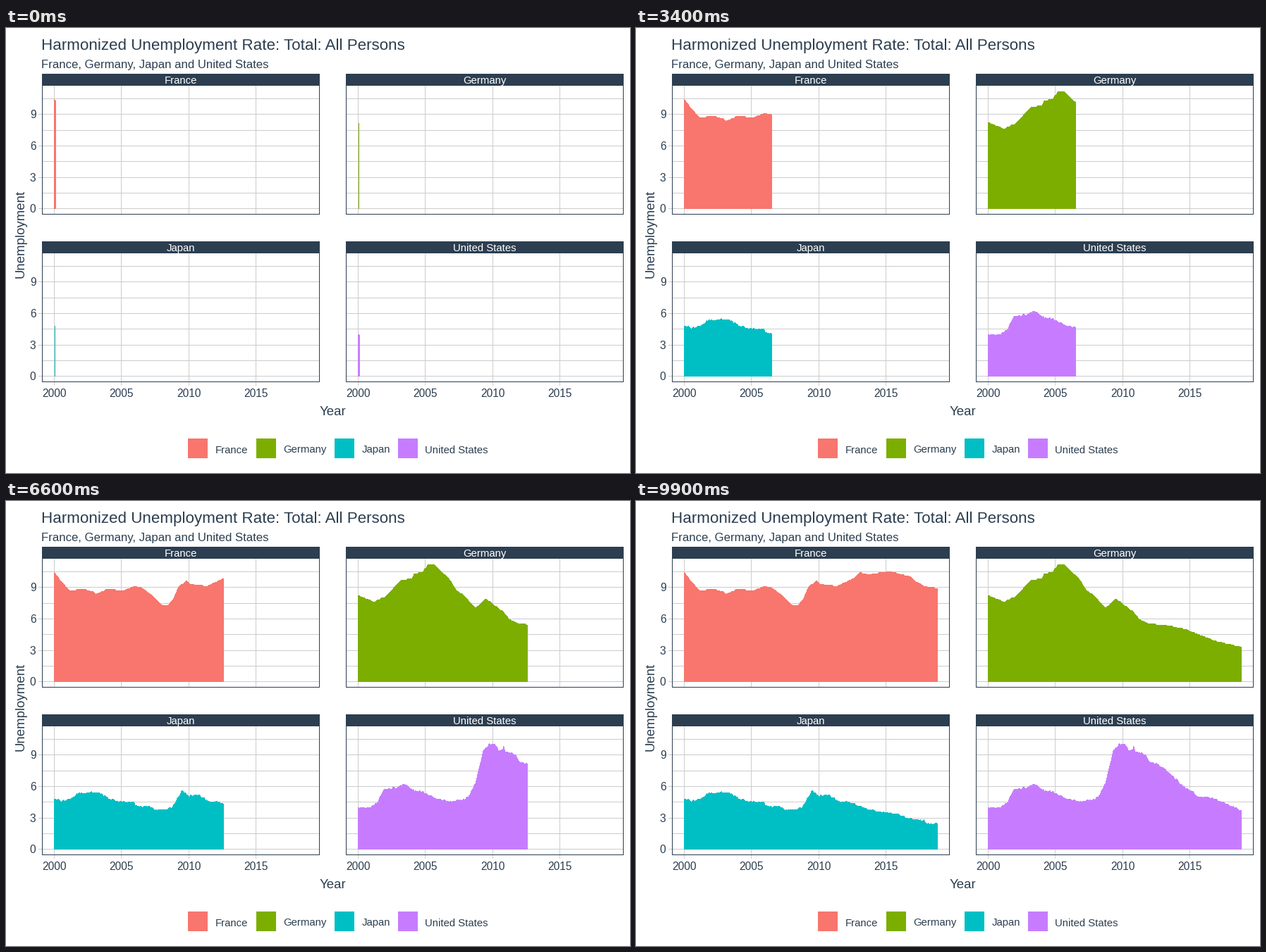
Animation, 885 px wide and 632 px high, one loop 10000 ms. Source, as a matplotlib script:

```python
import numpy as np
import matplotlib.pyplot as plt
from matplotlib.animation import FuncAnimation
from matplotlib.patches import Polygon, Rectangle

W, H, DPI = 885, 632, 64
FRAMES, LAST = 100, 226          # LAST: months after January 2000
NAVY, GREY = "#2c3e50", "#cccccc"
PT = 72 / DPI                    # points per pixel
UNIT = 14.88                     # pixels per percentage point
MONTH = 358.2 / LAST             # pixels per month

plt.rcParams["font.family"] = "Liberation Sans"

# Turning points: (month, rate)
FRANCE = [
    (0, 10.4), (6, 9.5), (13, 8.7), (26, 8.8), (34, 8.6), (37, 8.3),
    (47, 8.8), (62, 8.7), (72, 9.1), (79, 8.9), (88, 8.1), (96, 7.3),
    (102, 7.3), (106, 7.8), (111, 9), (118, 9.6), (121, 9.3), (136, 9.1),
    (151, 9.8), (157, 10.4), (164, 10.2), (184, 10.5), (202, 10),
    (206, 9.6), (214, 9.1), (226, 8.9),
]
GERMANY = [
    (0, 8.2), (14, 7.6), (24, 8.1), (39, 9.7), (48, 9.8), (50, 10.3),
    (57, 10.4), (63, 11.2), (67, 11.2), (81, 9.8), (88, 8.6), (92, 8.4),
    (105, 7), (114, 7.9), (130, 6.6), (134, 6), (143, 5.5), (157, 5.4),
    (176, 5), (202, 3.9), (226, 3.3),
]
JAPAN = [
    (0, 4.8), (5, 4.6), (15, 4.8), (21, 5.3), (39, 5.4), (47, 4.9),
    (57, 4.6), (71, 4.4), (73, 4.1), (86, 4), (90, 3.7), (105, 3.9),
    (111, 5), (114, 5.5), (120, 5.1), (129, 5.1), (139, 4.5), (147, 4.5),
    (167, 3.7), (191, 3.3), (205, 2.8), (215, 2.7), (217, 2.4), (226, 2.4),
]
STATES = [
    (0, 4), (11, 3.9), (17, 4.5), (23, 5.7), (33, 5.8), (41, 6.2),
    (49, 5.6), (59, 5.4), (65, 5), (81, 4.5), (93, 4.7), (99, 5),
    (105, 6.4), (112, 9.4), (117, 10), (123, 9.9), (125, 9.4), (129, 9.4),
    (130, 9.8), (131, 9.3), (140, 9), (144, 8.3), (151, 8.1), (156, 7.8),
    (171, 6.3), (188, 5), (200, 4.9), (226, 3.7),
]

rng = np.random.default_rng(4)
fig = plt.figure(figsize=(W / DPI, H / DPI), dpi=DPI, facecolor="white")
ax = fig.add_axes([0, 0, 1, 1])
ax.set_xlim(0, W)
ax.set_ylim(H, 0)
ax.axis("off")


def text(x, y, s, px, color=NAVY, **kw):
    return ax.text(x, y, s, fontsize=px * PT, color=color, va="baseline",
                   **kw)


def box(x, y, w, h, color, z=2):
    patch = Rectangle((x, y), w, h, fc=color, ec="none", lw=0, zorder=z)
    return ax.add_patch(patch)


def hline(x0, x1, y, color=GREY, z=1):
    box(x0, np.floor(y), x1 - x0, 1, color, z)


def vline(x, y0, y1, color=GREY, z=1):
    box(np.floor(x), y0, 1, y1 - y0, color, z)


def monthly(points, noise):
    """Monthly rates to one decimal, with a little survey noise."""
    months, rates = zip(*points)
    rate = np.interp(np.arange(LAST + 1), months, rates)
    return (rate + rng.uniform(-noise, noise, rate.size)).round(1)


class Panel:
    """One facet: strip, grid, frame and a growing area."""

    def __init__(self, name, color, rate, left, right, top, bottom):
        self.x0 = left + 17.9
        self.y0 = bottom - 8.34
        self.rate = rate

        for v in np.arange(0, 12, 1.5):
            hline(left, right, self.y0 - v * UNIT)
        for year in range(0, 20, 5):
            vline(self.x0 + year * 12 * MONTH, top, bottom)

        hline(left, right, bottom - 1, NAVY, 4)
        vline(left, top, bottom, NAVY, 4)
        vline(right - 1, top, bottom, NAVY, 4)
        strip = box(left, top - 17, right - left, 17, NAVY, 4)
        label = text((left + right) / 2, top - 3, name, 14.93, "white",
                     ha="center", zorder=5)
        label.set_clip_path(strip)

        self.area = ax.add_patch(Polygon([(0, 0)], fc=color, ec="none", lw=0,
                                         antialiased=False, zorder=3))

    def show(self, last):
        x = self.x0 + np.arange(last + 1) * MONTH
        y = self.y0 - self.rate[:last + 1] * UNIT
        base = [(x[-1], self.y0), (x[0], self.y0)]
        self.area.set_xy(np.vstack([np.column_stack([x, y]), base]))


COLS = [(51, 445), (482, 876)]
ROWS = [(82, 265), (320, 503)]
SERIES = [
    ("France", "#f8766d", monthly(FRANCE, 0), 258),
    ("Germany", "#7cae00", monthly(GERMANY, 0), 355),
    ("Japan", "#00bfc4", monthly(JAPAN, 0.1), 466),
    ("United States", "#c77cff", monthly(STATES, 0.08), 556),
]

panels = []
for i, (name, color, rate, key_x) in enumerate(SERIES):
    panels.append(Panel(name, color, rate, *COLS[i % 2], *ROWS[i // 2]))
    box(key_x, 583, 28, 28, color)
    text(key_x + 38.3, 603.5, name, 14.93)

for p in panels[::2]:
    for v in range(0, 10, 3):
        y = p.y0 - v * UNIT
        hline(46, 51, y)
        text(42.5, y + 5.7, str(v), 15.5, ha="right")
for p in panels[2:]:
    for year in range(0, 20, 5):
        x = p.x0 + year * 12 * MONTH
        vline(x, 503, 508)
        text(x, 524.3, str(2000 + year), 15.5, ha="center")

text(50, 31, "Harmonized Unemployment Rate: Total: All Persons", 22.4)
text(50, 56.5, "France, Germany, Japan and United States", 16.8)
text(463, 550, "Year", 18.67, ha="center")
text(25.5, 292, "Unemployment", 18.67, ha="center", rotation=90,
     rotation_mode="anchor")


def update(k):
    # Whole months only: each step reveals those rounding to it
    last = min(LAST, int((k + 0.5) * LAST / (FRAMES - 1)))
    for p in panels:
        p.show(last)
    return [p.area for p in panels]


anim = FuncAnimation(fig, update, frames=FRAMES, interval=100, repeat=True,
                     repeat_delay=0)
plt.show()
```
